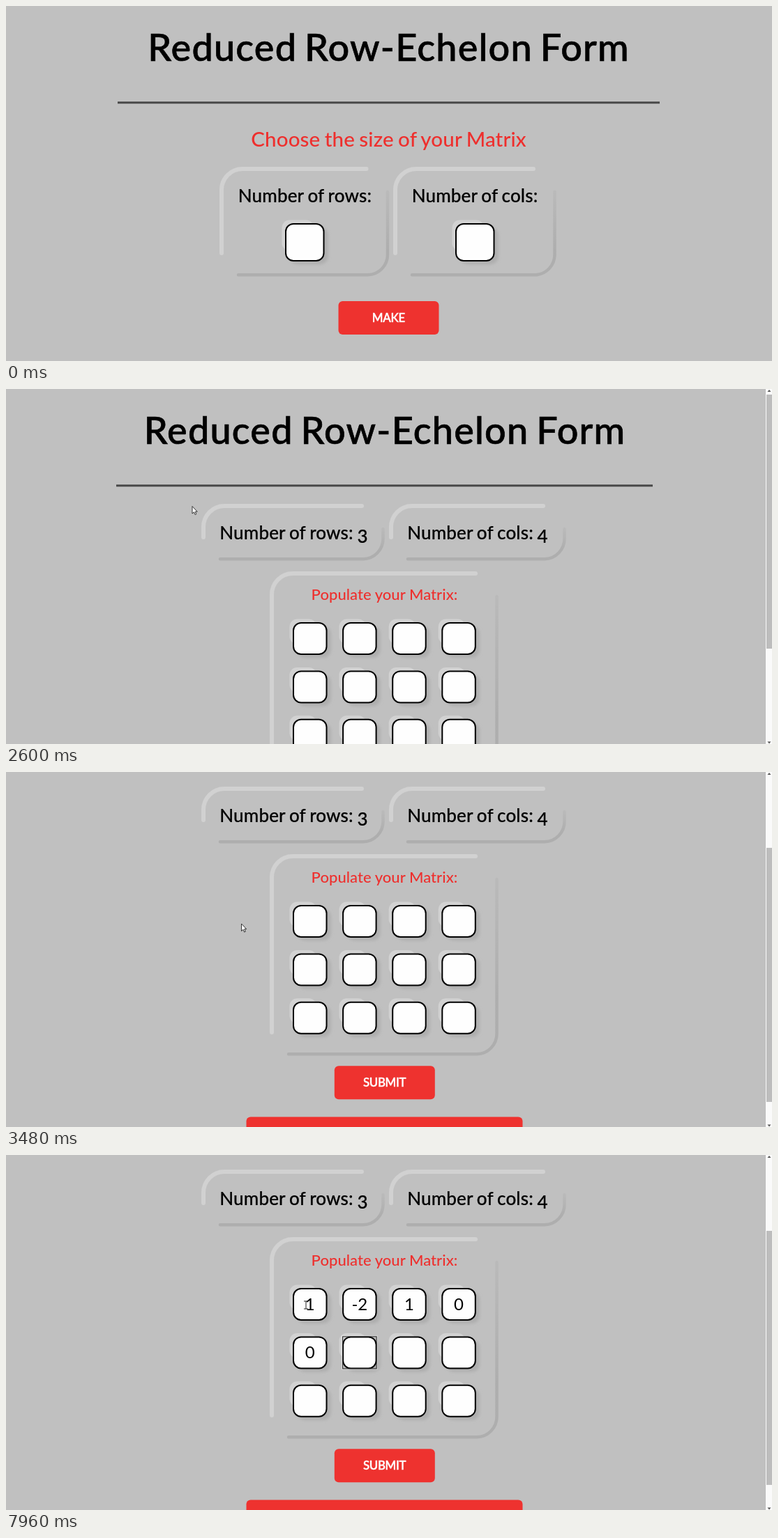
An HTML page that plays this animation: 1098 by 510 pixels, repeating every 8 s.

```html
<!DOCTYPE html>
<html lang="en">
<head>
<meta charset="utf-8">
<title>Reduced Row-Echelon Form</title>
<style>
html, body { margin: 0; width: 100%; height: 100%; overflow: hidden; background: #c0c0c0; }
svg { display: block; width: 100%; height: 100%; }
text { font-family: Lato, "Open Sans", sans-serif; font-weight: 500; text-anchor: middle; }
.title { font-size: 54px; letter-spacing: 1.2px; word-spacing: -4px; stroke: #000; stroke-width: .7; }
.lead { font-size: 29.5px; letter-spacing: .15px; word-spacing: -1.2px; fill: #ee2f2d; }
.prompt { font-size: 22px; letter-spacing: .05px; fill: #ee2f2d; }
.label { font-size: 26px; letter-spacing: .15px; word-spacing: -1px; stroke: #000; stroke-width: .2; }
.btn { font-size: 16.8px; font-weight: 600; letter-spacing: -.3px; fill: #fff; stroke: #fff; stroke-width: .4; }
.value { font-weight: 400; }
.red { fill: #ee322f; }
.light { fill: none; stroke: #d1d1d1; stroke-width: 6; stroke-linecap: round; }
.dark { fill: none; stroke: url(#fade); stroke-width: 4.5; stroke-linecap: round; }
.box { fill: #fefefe; stroke: #000; stroke-width: 2; }
</style>
</head>
<body>
<svg id="stage" viewBox="0 0 1098 510" preserveAspectRatio="none" xmlns="http://www.w3.org/2000/svg"></svg>
<script>
const LOOP = 8000, STEP = 40, SWITCH = 2480, BLINK = 500;
const stage = document.getElementById('stage');
const $ = id => document.getElementById(id);

const text = (cls, x, y, s) => `<text class="${cls}" x="${x}" y="${y}">${s}</text>`;
const rule = (x1, x2) => `<rect x="${x1}" y="137.3" width="${x2 - x1}" height="3" fill="#484848"/>`;
const button = (x, y, s) =>
  `<rect class="red" x="${x}" y="${y}" width="144" height="48" rx="6"/>` + text('btn', x + 71.8, y + 30, s);

// Raised panel: bright upper left edge, dim lower right edge.
function card(x1, y1, x2, y2) {
  const r = 27;
  return `<path class="light" d="M${x1 - 3} ${y2 - 29}V${y1 + r}A${r + 3} ${r + 3} 0 0 1 ${x1 + r} ${y1 - 3}H${x2 - 29}"/>` +
    `<path class="dark" d="M${x1 + 21} ${y2 + 2.3}H${x2 - r}A${r + 2} ${r + 2} 0 0 0 ${x2 + 1.5} ${y2 - r}V${y1 + 30}"/>`;
}

function cell(c, w, h) {
  const rect = (dx, dy, dw, extra) =>
    `<rect x="${c.x + dx}" y="${c.y + dy}" width="${w + dw}" height="${h + dw}" rx="11" ${extra}/>`;
  return rect(-5.5, -5.5, -9, 'fill="#d2d2d2" filter="url(#soft)"') +
    rect(6, 5, 0, 'fill="#aeaeae" filter="url(#blur)"') +
    rect(0, 0, 0, 'class="box"');
}

// A form owns its boxes, focus ring, caret and the list of [time, box, value] edits.
function form(id, cells, w, h, size, base, caretH, caretColor, edits) {
  const f = { id, cells, w, h, size, caretH, edits };
  f.markup = cells.map(c => cell(c, w, h)).join('') +
    cells.map((c, i) => `<text id="${id}v${i}" class="value" font-size="${size}" x="${c.x + w / 2}" y="${c.y + base}"></text>`).join('') +
    `<g id="${id}ring" fill="none"><rect x="-1.5" y="-1.5" width="${w + 3}" height="${h + 3}" stroke="#fff" stroke-opacity=".55"/>` +
    `<rect x="-.5" y="-.5" width="${w + 1}" height="${h + 1}" stroke="#222"/></g>` +
    `<rect id="${id}caret" width="1" height="${caretH}" fill="${caretColor}"/>`;
  return f;
}

const sizeForm = form('s', [{ x: 401, y: 313 }, { x: 645, y: 313 }], 54.5, 53, 43, 43, 51, '#666', [
  [1280, 0, ''], [1480, 0, '3'], [1640, 1, ''], [1800, 1, '4']
]);

const grid = Array.from({ length: 12 }, (_, i) => ({ x: 412 + 71.1 * (i % 4), y: 336 + 69.4 * Math.floor(i / 4) }));
const matrixForm = form('m', grid, 47.5, 45, 24, 31, 27, '#000', [
  [3760, 0, ''], [4000, 0, '1'], [4180, 1, ''], [4880, 1, '-'], [5080, 1, '-2'], [5280, 2, ''],
  [5640, 2, '1'], [5840, 3, ''], [6160, 3, '0'], [6340, 4, ''], [7160, 4, '0'], [7460, 5, '']
]);

// The digit hangs below the baseline like an old-style figure.
const counted = (x, s, n) => text('label', x, 216, `${s} <tspan dy="5">${n}</tspan>`);
const arrow = (y, d) => `<path d="M1091.5 ${y}h5l-2.5 ${d}z" fill="#555"/>`;

stage.innerHTML = `
<defs>
  <filter id="soft" x="-20%" y="-20%" width="140%" height="140%"><feGaussianBlur stdDeviation=".6"/></filter>
  <filter id="blur" x="-20%" y="-20%" width="140%" height="140%"><feGaussianBlur stdDeviation="2.2"/></filter>
  <linearGradient id="fade" x1="0" y1="0" x2="0" y2="1">
    <stop offset="0" stop-color="#aeaeae" stop-opacity=".35"/>
    <stop offset=".7" stop-color="#aeaeae"/>
  </linearGradient>
</defs>
<rect width="1098" height="510" fill="#c0c0c0"/>
<g id="sizePage">
  ${text('title', 548.5, 79, 'Reduced Row-Echelon Form')}
  ${rule(160, 937)}
  ${text('lead', 548.5, 202, 'Choose the size of your Matrix')}
  ${card(312, 237, 545.5, 384)}${card(561, 237, 785, 384)}
  ${text('label', 428.5, 281.5, 'Number of rows:')}
  ${text('label', 672, 281.5, 'Number of cols:')}
  ${sizeForm.markup}
  ${button(476.5, 424, 'MAKE')}
</g>
<g id="matrixPage">
  <g id="scroll">
    ${text('title', 543, 79, 'Reduced Row-Echelon Form')}
    ${rule(158, 927)}
    ${card(286, 171, 539, 242)}${card(555, 171, 799, 242)}
    ${counted(412.5, 'Number of rows:', 3)}
    ${counted(676, 'Number of cols:', 4)}
    ${card(384, 268, 702, 547)}
    ${text('prompt', 542.5, 302.5, 'Populate your Matrix:')}
    ${matrixForm.markup}
    ${button(470.8, 566.3, 'SUBMIT')}
    <rect class="red" x="344.5" y="639.5" width="396" height="48" rx="6"/>
  </g>
  <rect x="1089" width="9" height="510" fill="#fafafa"/>
  <rect id="thumb" x="1090" width="8" height="365" fill="#bdbdbd"/>
  ${arrow(4, -3)}${arrow(506.5, 3)}
</g>
<path id="pointer" d="M0 0V10.5L2.5 8.3L4.1 12L5.8 11.2L4.2 7.7H7.2Z" fill="#fff" stroke="#222" stroke-width=".9"/>
<path id="beam" d="M-3 -5.5H3M-3 5.5H3M0 -5.5V5.5" fill="none" stroke="#222"/>`;

const show = (id, on) => $(id).setAttribute('display', on ? 'inline' : 'none');
const move = (id, x, y) => $(id).setAttribute('transform', `translate(${x} ${y})`);
const ease = u => u * u * (3 - 2 * u);
const clamp = u => Math.max(0, Math.min(1, u));

// Cursor stops: time, x, y.
const trail = [
  [120, 683, 432], [680, 128, 33], [1160, 267, 168.5], [3240, 267, 168.5],
  [3360, 266, 162.5], [3480, 337.5, 218], [3720, 430, 215.5]
];

function cursorAt(t) {
  const i = trail.findIndex(p => p[0] > t);
  if (i < 0) return trail[trail.length - 1].slice(1);
  const a = trail[Math.max(0, i - 1)], b = trail[i];
  const u = ease(clamp((t - a[0]) / (b[0] - a[0])));
  return [a[1] + (b[1] - a[1]) * u, a[2] + (b[2] - a[2]) * u];
}

function updateForm(f, t) {
  const values = f.cells.map(() => '');
  let last = null;
  for (const e of f.edits) {
    if (e[0] > t) break;
    values[e[1]] = e[2];
    last = e;
  }
  values.forEach((v, i) => { $(f.id + 'v' + i).textContent = v; });
  show(f.id + 'ring', last);
  show(f.id + 'caret', last && Math.floor((t - last[0]) / BLINK) % 2 === 0);
  if (!last) return;
  const c = f.cells[last[1]];
  const half = [...last[2]].reduce((w, ch) => w + (ch === '-' ? .36 : .55), 0) * f.size / 2;
  move(f.id + 'ring', c.x, c.y);
  move(f.id + 'caret', Math.round(c.x + f.w / 2 + half - .3), Math.round(c.y + (f.h - f.caretH) / 2));
}

function render(t) {
  const first = t < SWITCH;
  show('sizePage', first);
  show('matrixPage', !first);
  updateForm(first ? sizeForm : matrixForm, t);

  const scroll = 144 * ease(clamp((t - 3360) / 120));
  move('scroll', 0, -scroll);
  $('thumb').setAttribute('y', 8 + scroll * .701);

  const [x, y] = cursorAt(t);
  const typing = !first && x > 411;
  show('pointer', t >= 120 && !typing);
  show('beam', typing);
  move('pointer', x, y);
  move('beam', x, y);
}

const start = performance.now();
function tick() {
  const t = (performance.now() - start) % LOOP;
  render(Math.floor(t / STEP) * STEP);
  requestAnimationFrame(tick);
}
render(0);
tick();
</script>
</body>
</html>
```
